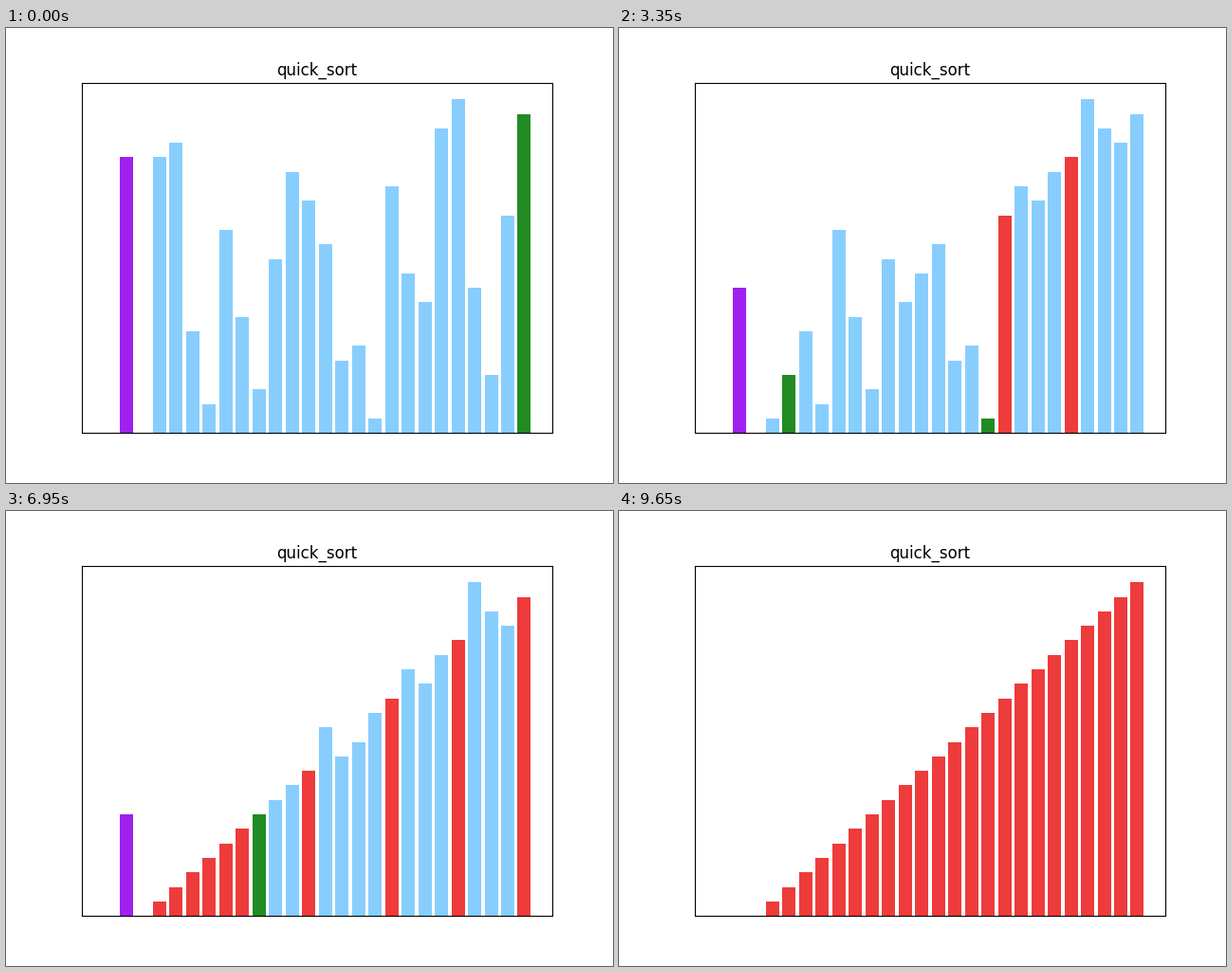
These frames come from a looping animation (640x480 px, 9800 ms). A matplotlib script:

```python
import matplotlib.pyplot as plt
from matplotlib.animation import FuncAnimation

VALUES = [19, 20, 7, 2, 14, 8, 3, 12, 18, 16, 13, 5,
          6, 1, 17, 11, 9, 21, 23, 10, 4, 15, 22]
BLUE, GREEN, RED, PURPLE = "#87CEFF", "#228B22", "#EE3B3B", "#A020F0"
STEP_MS = 50


def record_sort(values):
    """Run quick sort and return (heights, colors, pivot) for every step."""
    a = list(values)
    colors = [BLUE] * len(a)
    steps = []

    def snap(pivot=0):
        steps.append((a[:], colors[:], pivot))

    def move(old, new):
        colors[old] = BLUE
        colors[new] = GREEN

    def sort(low, high):
        if low >= high:
            colors[high] = RED  # high may be -1, which marks the last bar
            snap()
            return
        pivot, i, j = a[low], low, high
        colors[j] = GREEN
        while i < j:
            snap(pivot)
            while i < j and a[j] >= pivot:
                move(j, j - 1)
                j -= 1
                snap(pivot)
            a[i] = a[j]
            snap(pivot)
            while i < j and a[i] <= pivot:
                move(i, i + 1)
                i += 1
                snap(pivot)
            a[j] = a[i]
            snap(pivot)
        a[i] = pivot
        colors[i] = RED
        snap()
        sort(low, i - 1)
        sort(i + 1, high)

    sort(0, len(a) - 1)
    return steps


steps = record_sort(VALUES)
n = len(VALUES)

fig, ax = plt.subplots(figsize=(6.4, 4.8), dpi=100)
ax.set_title("quick_sort")
ax.set_xticks([])
ax.set_yticks([])
bars = ax.bar(range(n), VALUES, color=BLUE)
pivot_bar = ax.bar([-2], [0], color=PURPLE)[0]

# 5 % margins around slots -3 to n - 1
left, right = -3.4, n - 0.6
pad = 0.05 * (right - left)
ax.set_xlim(left - pad, right + pad)
ax.set_ylim(0, 1.05 * max(VALUES))


def draw(k):
    heights, colors, pivot = steps[k]
    for bar, height, color in zip(bars, heights, colors):
        bar.set_height(height)
        bar.set_color(color)
        bar.set_linewidth(0)
    pivot_bar.set_height(pivot)
    pivot_bar.set_visible(pivot > 0)
    return [*bars, pivot_bar]


anim = FuncAnimation(fig, draw, frames=len(steps), init_func=lambda: draw(0),
                     interval=STEP_MS, repeat=True, repeat_delay=0)
plt.show()
```
